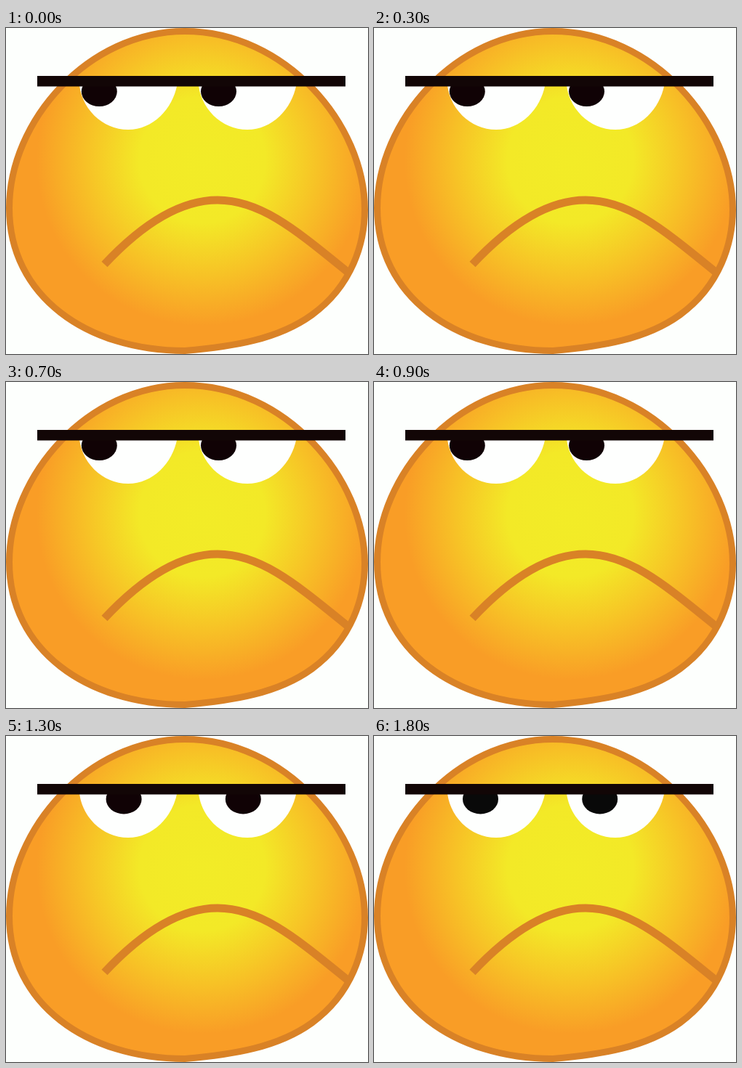
Animation, 498 px wide and 449 px high, one loop 1.9 s. Source, as an HTML page:

```html
<!DOCTYPE html>
<html lang="en">
<head>
<meta charset="utf-8">
<title>Side-eye face</title>
<style>
  html, body { margin: 0; width: 100%; height: 100%; overflow: hidden; background: #fdfffd; }
  svg { display: block; width: 498px; height: 449px; }
</style>
</head>
<body>
<svg viewBox="0 0 498 449">
  <defs>
    <radialGradient id="skin" gradientUnits="userSpaceOnUse" cx="270" cy="182" r="228">
      <stop offset="0" stop-color="#f2ec27"/>
      <stop offset=".38" stop-color="#f3e927"/>
      <stop offset=".7" stop-color="#f7c226"/>
      <stop offset="1" stop-color="#f99d26"/>
    </radialGradient>
    <clipPath id="below"><rect y="73" width="498" height="376"/></clipPath>
  </defs>
  <path fill="url(#skin)" stroke="#d98226" stroke-width="9"
    d="M246 4.5C384 4.5 493.5 132 493.5 250C493.5 295 477 354 421 395C374 429 312 439 246 444.5C111 444.5 4.5 369 4.5 248C4.5 128 113 4.5 246 4.5Z"/>
  <path fill="none" stroke="#d98226" stroke-width="11"
    d="M135.5 325.5C179 279 233 237 291 237C352 237 402 281 472.5 338"/>
  <g clip-path="url(#below)">
    <g fill="#fefffe">
      <path id="eye" d="M100.5 73C102 110 132 140 168 140C202 140 229 112 235.5 78V73Z"/>
      <use href="#eye" x="164"/>
    </g>
    <g id="pupils">
      <ellipse cx="128.3" cy="87.5" rx="24.5" ry="20.5"/>
      <ellipse cx="292.5" cy="87.5" rx="24.5" ry="20.5"/>
    </g>
  </g>
  <rect x="43" y="66" width="424" height="14.5" fill="#120606"/>
</svg>
<script>
  const LOOP = 1900;
  const pupils = document.getElementById('pupils');

  // Each look holds from its start time until the next one.
  const looks = [
    { at: 0, dx: 0, dy: 0, ink: '#100205' },
    { at: 1100, dx: 18.2, dy: -0.6, ink: '#090909' },
    { at: 1200, dx: 33.8, dy: -0.6, ink: '#100205' },
    { at: 1800, dx: 18.2, dy: -0.6, ink: '#090909' }
  ];

  function draw(t) {
    const { dx, dy, ink } = looks.filter(look => look.at <= t).pop();
    pupils.setAttribute('transform', `translate(${dx} ${dy})`);
    pupils.setAttribute('fill', ink);
  }

  const start = performance.now();
  function tick() {
    draw((performance.now() - start) % LOOP);
    requestAnimationFrame(tick);
  }
  tick();
</script>
</body>
</html>
```
